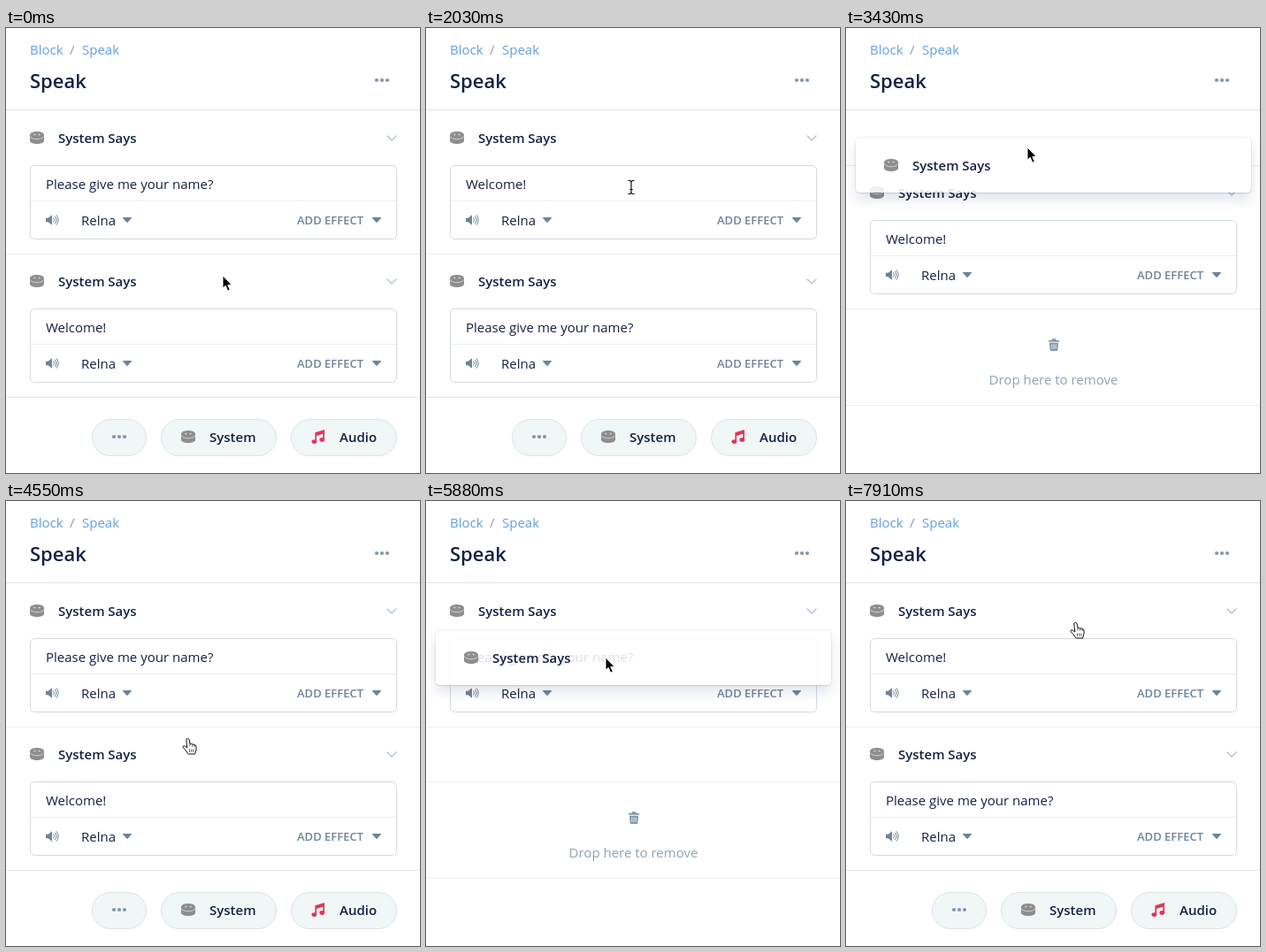
An HTML page that plays this animation: 468x503 px, repeating every 7.98 s.

```html
<!DOCTYPE html>
<html lang="en">
<head>
<meta charset="utf-8">
<title>Reorder dialog blocks</title>
<style>
  html, body { margin: 0; width: 100%; height: 100%; overflow: hidden; background: #fff; }
  #stage { position: relative; width: 468px; height: 503px; overflow: hidden; }
  svg { position: absolute; left: 0; top: 0; display: block; }
  text { font: 15px "Open Sans", sans-serif; fill: #132144; }
  .semi { font-weight: 600; }
  .title { font-size: 22px; font-weight: 600; }
  .link { fill: #62a0e6; }
  .slash { fill: #8c9baa; }
  .effect { font-size: 13px; font-weight: 600; fill: #6e849a; }
  .hint { fill: #8da2b5; }
  .rule { stroke: #eaeff2; }
  .edge { stroke: #dfe5ea; }
  .steel { fill: #6e849a; }
  .pill { fill: #f1f6f7; stroke: #dbe4e8; }
  #card {
    position: absolute; left: 11px; top: 0; width: 447px; height: 62px;
    border-radius: 5px; background: rgba(255, 255, 255, .86);
    box-shadow: 0 0 0 1px rgba(17, 49, 96, .06), 0 1px 2px rgba(17, 49, 96, .1),
                0 8px 14px rgba(17, 49, 96, .12);
  }
</style>
</head>
<body>
<div id="stage">
  <svg width="468" height="503">
    <defs>
      <g id="disk">
        <path d="M-8-3.2C-8-8.4 8-8.4 8-3.2V3.2C8 8.2 -8 8.2 -8 3.2Z" fill="#8e8e8e"/>
        <path d="M-8-1.6C-6 2.8 6 2.8 8-1.6" fill="none" stroke="#d0d0d0"/>
        <ellipse cx="-2.7" cy="-3.4" rx="1.2" ry=".8" fill="#d8d8d8"/>
        <ellipse cx="2.7" cy="-3.4" rx="1.2" ry=".8" fill="#d8d8d8"/>
      </g>
      <g id="dots" fill="#8196a9">
        <circle cx="-6" r="2.1"/><circle r="2.1"/><circle cx="6" r="2.1"/>
      </g>
      <path id="caret" class="steel" d="M-4.3-3H4.3Q5.6-3 4.8-1.9L.8 2.6Q0 3.4-.8 2.6L-4.8-1.9Q-5.6-3-4.3-3Z"/>
      <g id="speaker">
        <path class="steel" d="M45 121.7h2.6l4.4-3.5v11.6l-4.4-3.5H45Z"/>
        <path d="M53.8 121.8q1.8 2.2 0 4.4M55.5 120.2q3.2 3.8 0 7.6M57.1 118.6q4.4 5.4 0 10.8"
          fill="none" stroke="#6e849a" stroke-linecap="round"/>
      </g>
      <g id="section">
        <use href="#disk" x="35" y="31"/>
        <text class="semi" x="59" y="36.5">System Says</text>
        <path d="M431 29l5 5 5-5" fill="none" stroke="#b5c6d8" stroke-width="1.5" stroke-linecap="round" stroke-linejoin="round"/>
        <rect x="27.5" y="62.5" width="414" height="83" rx="5" fill="#fff" stroke="#d2d9df"/>
        <path class="rule" d="M28 102.5H441"/>
        <use href="#speaker"/>
        <text x="85" y="130">Relna</text>
        <use href="#caret" x="137" y="124"/>
        <text class="effect" x="329" y="129">ADD EFFECT</text>
        <use href="#caret" x="419" y="124"/>
        <path class="rule" d="M0 162.5H468"/>
      </g>
    </defs>

    <text class="link" x="27" y="30">Block</text>
    <text class="slash" x="72" y="30">/</text>
    <text class="link" x="86" y="30">Speak</text>
    <text class="title" x="27" y="68">Speak</text>
    <use href="#dots" x="425" y="59"/>
    <path class="edge" d="M0 92.5H468"/>

    <g id="first"><use href="#section"/><text x="45" y="89"></text></g>
    <g id="second"><use href="#section"/><text x="45" y="89"></text></g>

    <g id="footer">
      <path class="edge" d="M0 417.5H468"/>
      <rect class="pill" x="97.5" y="442.5" width="61" height="41" rx="20.5"/>
      <rect class="pill" x="175.5" y="442.5" width="130" height="41" rx="20.5"/>
      <rect class="pill" x="322.5" y="442.5" width="119" height="41" rx="20.5"/>
      <use href="#dots" x="128" y="462"/>
      <use href="#disk" x="206" y="462"/>
      <text class="semi" x="230" y="467.5">System</text>
      <g fill="#e0365c">
        <path d="M349.4 457.2L360 454v11.5h-1.7v-6.7l-7.2 2.2v6.5h-1.7Z"/>
        <ellipse cx="348.4" cy="467.6" rx="2.9" ry="2.3"/>
        <ellipse cx="357.3" cy="465.4" rx="2.9" ry="2.3"/>
      </g>
      <text class="semi" x="377" y="467.5">Audio</text>
    </g>

    <g id="bin">
      <path id="gap" class="rule" d="M0 .5H468"/>
      <path class="rule" d="M0 317.5H468M0 426.5H468"/>
      <path d="M229 353h3.3l.9-1.8h3.6l.9 1.8h3.3v1.8H229ZM230 355.8h10l-.6 8q-.1 1.2-1.3 1.2h-6.2q-1.2 0-1.3-1.2Z" fill="#8196a9"/>
      <path d="M232.8 357.5v5.5M235 357.5v5.5M237.2 357.5v5.5" stroke="#fff" stroke-width=".8"/>
      <text class="hint" x="234.5" y="403" text-anchor="middle">Drop here to remove</text>
    </g>
  </svg>

  <div id="card">
    <svg width="447" height="62">
      <use href="#disk" x="40" y="31"/>
      <text class="semi" x="64" y="36.5">System Says</text>
    </svg>
  </div>

  <svg width="468" height="503">
    <g id="cursor">
      <path id="arrow" d="M0 0V14.2L3.2 11.3 5.7 17.2 8.3 16.1 5.8 10.4H10.2Z" fill="#000" stroke="#fff"/>
      <g id="hand" stroke="#111" stroke-linejoin="round">
        <path fill="#fff" d="M-2.2 1Q-2-.8-.5-.6 1-.4 1.2 1L2 5.6Q3.2 4.6 4.6 6 6 5.4 7 6.8 9 6.4 9 8.8V12L7.6 17H.2L-3 12.9-6 9.4Q-6 7.2-4 7.8L-1.2 10Z"/>
        <path fill="none" stroke-width=".7" d="M2 5.6V8.4M4.6 6V8.6M7 6.8V9M1.6 11.4v3.4M3.8 11.4v3.4M6 11.4v3.4"/>
      </g>
      <path id="beam" d="M-3.5-7.5Q0-8 0-5.5 0-8 3.5-7.5M0-6V6M-3.5 7.5Q0 8 0 5.5 0 8 3.5 7.5M-1.8 2.5H1.8"
        fill="none" stroke="#111" stroke-width="1.2"/>
    </g>
  </svg>
</div>

<script>
const LOOP = 7980, STEP = 70;
const LINES = ["Please give me your name?", "Welcome!"];
const CARD_TOP = 263, SWAP_AT = 174;

// The pointer rests between eased moves
const START = { x: 245, y: 280 };
const MOVES = [
  { from: 280, to: 630, x: 240, y: 184 },
  { from: 770, to: 910, x: 239, y: 128 },
  { from: 1120, to: 1190, x: 239, y: 122 },
  { from: 1540, to: 1820, x: 232, y: 180 },
  { from: 2030, to: 2800, x: 205, y: 274 },
  { from: 2870, to: 3500, x: 205, y: 130 },
  { from: 3920, to: 4550, x: 206, y: 269 },
  { from: 4550, to: 4760, x: 206, y: 294 },
  { from: 5110, to: 5880, x: 203, y: 177 },
  { from: 5880, to: 6300, x: 203, y: 127 },
  { from: 6790, to: 7630, x: 260, y: 138 }
];

// Each drag lifts the lower block
const DRAGS = [
  { start: 350, drop: 1610 },
  { start: 2870, drop: 3990 },
  { start: 5110, drop: 6720 }
];

const el = id => document.getElementById(id);
const show = (id, on) => { el(id).style.display = on ? "" : "none"; };
const moveTo = (id, x, y) => el(id).setAttribute("transform", `translate(${x} ${y})`);
const setLine = (id, line) => { el(id).querySelector("text").textContent = line; };
const between = (v, lo, hi) => v >= lo && v < hi;
const ease = k => k * k * (3 - 2 * k);

function pointerAt(t) {
  let { x, y } = START;
  for (const move of MOVES) {
    const k = ease(Math.min(1, Math.max(0, (t - move.from) / (move.to - move.from))));
    x += (move.x - x) * k;
    y += (move.y - y) * k;
  }
  return { x: Math.round(x), y: Math.round(y) };
}

function pointerShape(t, y, dragging) {
  if (dragging || t < DRAGS[0].start) return "arrow";
  if (between(y, 93, 155) || between(y, 255, 317)) return "hand";
  if (between(y, 155, 195) || between(y, 317, 357)) return "beam";
  return "arrow";
}

function render(t) {
  const { x, y } = pointerAt(t);
  const drag = DRAGS.find(({ start, drop }) => between(t, start, drop));
  const top = DRAGS.filter(({ drop }) => t >= drop).length % 2;
  const swapped = drag && y < SWAP_AT;

  setLine("first", LINES[top]);
  setLine("second", LINES[1 - top]);
  moveTo("first", 0, swapped ? 155 : 93);
  moveTo("second", 0, 255);
  show("second", !drag);
  show("footer", !drag);
  show("bin", drag);
  show("card", drag);
  if (drag) {
    moveTo("gap", 0, swapped ? 155 : 255);
    el("card").style.transform = `translateY(${CARD_TOP + y - pointerAt(drag.start).y}px)`;
  }

  const shape = pointerShape(t, y, drag);
  for (const id of ["arrow", "hand", "beam"]) show(id, id === shape);
  moveTo("cursor", x, y);
}

const began = performance.now();
function tick() {
  const t = (performance.now() - began) % LOOP;
  render(Math.floor(t / STEP) * STEP);
  requestAnimationFrame(tick);
}
tick();
</script>
</body>
</html>
```
